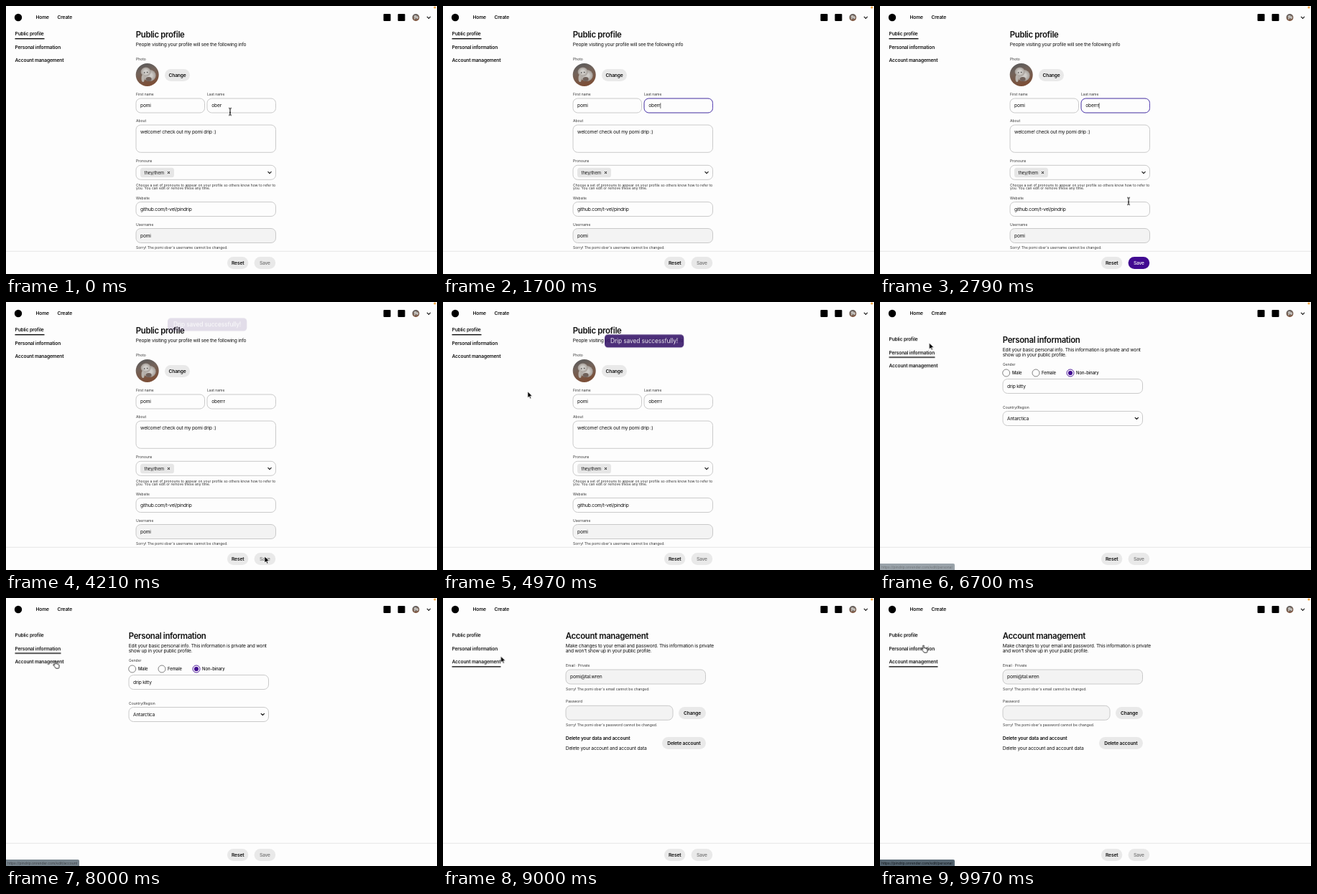
An HTML page for the animation above (10 s loop, 600 by 374 pixels).

```html
<!DOCTYPE html>
<html lang="en">
<head>
<meta charset="utf-8">
<title>Profile settings</title>
<style>
  html, body { margin: 0; width: 100%; height: 100%; overflow: hidden; background: #fdfdfd; }
  svg { display: block; width: 600px; height: 374px; }

  text { font: 400 6.67px Inter, Roboto, sans-serif; letter-spacing: -.03em; fill: #111; white-space: pre; }
  .bold { font-weight: 600; letter-spacing: -.025em; }
  .title { font-size: 11.4px; font-weight: 600; }
  .small { font-size: 5px; letter-spacing: 0; fill: #333; }
  .medium { font-size: 5.83px; letter-spacing: 0; font-weight: 500; }
  .mid { text-anchor: middle; }
  .field rect, .radio { fill: #fdfdfd; stroke: #c4c4c4; stroke-width: .9; }
  .field .off { fill: #f3f3f3; }
  .radio { stroke: #777; }
  .pill { fill: #e9e9e9; }
  .chevron { fill: none; stroke: #111; stroke-width: 1.1; stroke-linecap: round; stroke-linejoin: round; }

  /* One loop is 10 s, so 1% of a timeline is 100 ms. */
  .anim { animation: 10s linear infinite; }
  .step { animation: 10s step-end infinite; }

  .profile { animation-name: profile; }
  .personal { animation-name: personal; }
  .account { animation-name: account; }
  @keyframes profile { 0% { opacity: 1 } 66%, 100% { opacity: 0 } }
  @keyframes personal { 0% { opacity: 0 } 66% { opacity: 1 } 84.5%, 100% { opacity: 0 } }
  @keyframes account { 0% { opacity: 0 } 84.5%, 100% { opacity: 1 } }

  .nav { animation-name: nav; }
  @keyframes nav { 0% { transform: none } 66%, 100% { transform: translateY(13.2px) } }

  .focus { animation-name: focus; }
  @keyframes focus { 0% { opacity: 0 } 13% { opacity: 1 } 33.9%, 100% { opacity: 0 } }
  .caret { animation-name: caret; }
  @keyframes caret {
    0% { transform: none }
    17% { transform: translateX(2.3px) }
    19.5%, 100% { transform: translateX(4.6px) }
  }
  .key1 { animation-name: key1; }
  .key2 { animation-name: key2; }
  @keyframes key1 { 0% { fill: transparent } 17%, 100% { fill: #111 } }
  @keyframes key2 { 0% { fill: transparent } 19.5%, 100% { fill: #111 } }

  .save { animation-name: save; }
  .save-label { animation-name: save-label; }
  @keyframes save { 0%, 17% { fill: #e9e9e9 } 18.5%, 39.3% { fill: #410a91 } 40.3%, 100% { fill: #e9e9e9 } }
  @keyframes save-label { 0%, 17% { fill: #707070 } 18.5%, 39.3% { fill: #fff } 40.3%, 100% { fill: #707070 } }

  .toast { animation-name: toast; }
  .toast text { font-size: 8.33px; letter-spacing: -.01em; fill: #fff; }
  @keyframes toast {
    0% { opacity: 0; transform: translateY(-30px) }
    40.2% { opacity: 0; transform: translateY(-30px); animation-timing-function: ease }
    55.2%, 100% { opacity: 1; transform: none }
  }

  .status { animation-name: status; }
  .status text { letter-spacing: -.01em; fill: #10161b; }
  @keyframes status {
    0%, 60.6% { opacity: 0 } 61.7%, 66% { opacity: 1 }
    68.5%, 78.8% { opacity: 0 } 80.3%, 84.5% { opacity: 1 }
    87.5%, 97.6% { opacity: 0 } 98.8%, 100% { opacity: 1 }
  }
  .to-personal { animation-name: to-personal; }
  .to-account { animation-name: to-account; }
  @keyframes to-personal { 0% { opacity: 1 } 75% { opacity: 0 } 91%, 100% { opacity: 1 } }
  @keyframes to-account { 0% { opacity: 0 } 75% { opacity: 1 } 91%, 100% { opacity: 0 } }

  .pointer { animation-name: pointer; }
  @keyframes pointer {
    0%, .3% { transform: translate(312px, 147.5px) }
    2.1% { transform: translate(306px, 142px) }
    23.6% { transform: translate(306px, 142px); animation-timing-function: ease-in }
    27.9% { transform: translate(346px, 272px); animation-timing-function: ease-out }
    32.1% { transform: translate(360px, 355px) }
    43.9% { transform: translate(360px, 355px); animation-timing-function: cubic-bezier(.4, 0, .8, .8) }
    49.7% { transform: translate(118px, 125px); animation-timing-function: ease-out }
    53.9% { transform: translate(83px, 82px); animation-timing-function: step-end }
    56.7% { transform: translate(70px, 74px); animation-timing-function: step-end }
    58.5% { transform: translate(67px, 68px); animation-timing-function: step-end }
    60.9%, 73.3% { transform: translate(68.5px, 57px) }
    74.8%, 78.5% { transform: translate(68px, 80px) }
    79.4%, 86% { transform: translate(68.5px, 88px) }
    88.2%, 88.8% { transform: translate(82px, 86px) }
    90.3% { transform: translate(80px, 80px) }
    91.8% { transform: translate(80px, 80px); animation-timing-function: ease-in-out }
    98.2%, 100% { transform: translate(60.5px, 66px) }
  }
  .beam { animation-name: beam; fill: none; stroke: #000; }
  .arrow { animation-name: arrow; stroke: #fff; stroke-width: .7; }
  .hand { animation-name: hand; fill: #fff; stroke: #000; stroke-width: .8; stroke-linejoin: round; }
  @keyframes beam { 0% { opacity: 1 } 17% { opacity: 0 } 23.6% { opacity: 1 } 30.8%, 100% { opacity: 0 } }
  @keyframes arrow {
    0% { opacity: 0 } 39.8% { opacity: 1 } 60.9% { opacity: 0 }
    66% { opacity: 1 } 78.8% { opacity: 0 } 87% { opacity: 1 } 97.2%, 100% { opacity: 0 }
  }
  @keyframes hand {
    0% { opacity: 0 } 30.8% { opacity: 1 } 39.8% { opacity: 0 } 60.9% { opacity: 1 }
    66% { opacity: 0 } 78.8% { opacity: 1 } 87% { opacity: 0 } 97.2%, 100% { opacity: 1 }
  }
</style>
</head>
<body>
<svg viewBox="0 0 600 374">
  <defs>
    <path id="chevron" class="chevron" d="M-2.2-1.1 0 1.1 2.2-1.1"/>
    <linearGradient id="floor" x2=".3" y2="1">
      <stop offset="0" stop-color="#55585a"/>
      <stop offset=".45" stop-color="#73635a"/>
      <stop offset="1" stop-color="#7b4f38"/>
    </linearGradient>
    <radialGradient id="fur">
      <stop offset=".4" stop-color="#cfccc8"/>
      <stop offset="1" stop-color="#a39c96"/>
    </radialGradient>
    <g id="photo">
      <circle r="16" fill="url(#floor)"/>
      <ellipse cx="3" cy="1" rx="9" ry="8" fill="url(#fur)"/>
      <ellipse cx="-2" cy="-4" rx="7" ry="6.5" fill="url(#fur)"/>
      <ellipse cx="-6" cy="5" rx="2.2" ry="5" fill="#b9b3ad"/>
      <ellipse cx="2" cy="6" rx="4" ry="3" fill="#70615a"/>
      <circle cx="-4" cy="-3" r=".8" fill="#333"/>
      <circle cx="0" cy="-3.5" r=".8" fill="#333"/>
    </g>
  </defs>

  <rect width="600" height="374" fill="#fdfdfd"/>
  <circle cx="597" cy="2" r="1.6" fill="#f0a23c"/>

  <!-- Header -->
  <circle cx="17" cy="16" r="5.2"/>
  <text class="bold" x="41.5" y="18.4">Home</text>
  <text class="bold" x="71.5" y="18.4">Create</text>
  <rect x="525.5" y="11" width="10" height="10" rx="1"/>
  <rect x="545.5" y="11" width="10" height="10" rx="1"/>
  <use href="#photo" transform="translate(570.5 16) scale(.31)"/>
  <use href="#chevron" x="588.5" y="16.3"/>

  <!-- Side navigation -->
  <g class="nav step">
    <text class="bold" x="12.5" y="41.3">Public profile</text>
    <text class="bold" x="12.5" y="59.6">Personal information</text>
    <text class="bold" x="12.5" y="78">Account management</text>
    <rect class="profile step" x="12.5" y="45" width="41" height="1.3"/>
    <rect class="personal step" x="12.5" y="63.3" width="64" height="1.3"/>
    <rect class="account step" x="12.5" y="82" width="68" height="1.3"/>
  </g>

  <!-- Public profile -->
  <g class="profile step">
    <text class="title" x="180.8" y="43.9">Public profile</text>
    <text x="180.8" y="56">People visiting your profile will see the following info</text>
    <text class="small" x="181" y="75.9">Photo</text>
    <use href="#photo" x="196.7" y="96"/>
    <rect class="pill" x="221" y="88" width="35" height="17" rx="8.5"/>
    <text class="bold mid" x="238.5" y="98.9">Change</text>

    <text class="small" x="181" y="125.3">First name</text>
    <text class="small" x="280" y="125.3">Last name</text>
    <text class="small" x="181" y="161.9">About</text>
    <text class="small" x="181" y="218">Pronouns</text>
    <text class="small" x="181" y="252">Choose a set of pronouns to appear on your profile so others know how to refer to</text>
    <text class="small" x="181" y="256.4">you. You can edit or remove these any time.</text>
    <text class="small" x="181" y="269.8">Website</text>
    <text class="small" x="181" y="306.7">Username</text>
    <text class="small" x="181" y="339.3">Sorry! The pomi ober's username cannot be changed.</text>

    <g class="field">
      <rect x="181" y="129" width="95.5" height="20" rx="6.5"/>
      <rect x="280" y="129" width="95.5" height="20" rx="6.5"/>
      <rect x="181" y="166" width="194.5" height="38.3" rx="6.5"/>
      <rect x="181" y="222.3" width="194.5" height="20" rx="6.5"/>
      <rect x="181" y="273.5" width="194.5" height="20" rx="6.5"/>
      <rect class="off" x="181" y="310.5" width="194.5" height="20" rx="6.5"/>
    </g>
    <text x="187" y="141.4">pomi</text>
    <text x="286.3" y="141.4">ober<tspan class="key1 step">r</tspan><tspan class="key2 step">r</tspan></text>
    <text x="187" y="178.3">welcome! check out my pomi drip :)</text>
    <rect x="187" y="225.7" width="47" height="13.5" rx="3.5" fill="#e6e6e6"/>
    <text class="medium" style="font-weight:400" x="192.5" y="234.6">they/them</text>
    <path d="m225 231 3 3m0-3-3 3" stroke="#111"/>
    <use href="#chevron" x="367" y="232.5"/>
    <text x="187" y="286">github.com/t-vel/pindrip</text>
    <text x="187" y="323">pomi</text>

    <g class="focus step">
      <rect x="280" y="129" width="95.5" height="20" rx="6.5" fill="none" stroke="#5b45b8"/>
      <rect class="caret step" x="300.2" y="135.3" width=".6" height="7.6"/>
    </g>

    <g class="toast anim">
      <rect x="225" y="48.3" width="110.3" height="18" rx="4.5" fill="#3a1a6c"/>
      <text class="mid" x="280" y="60.4">Drip saved successfully!</text>
    </g>
  </g>

  <!-- Personal information -->
  <g class="personal step">
    <text class="title" x="170.8" y="57">Personal information</text>
    <text x="170.8" y="69.3">Edit your basic personal info. This information is private and wont</text>
    <text x="170.8" y="75.9">show up in your public profile.</text>
    <text class="small" x="171" y="89.2">Gender</text>
    <circle class="radio" cx="175.7" cy="99" r="5"/>
    <circle class="radio" cx="217" cy="99" r="5"/>
    <circle class="radio" cx="265" cy="99" r="5" style="stroke:#410a91"/>
    <circle cx="265" cy="99" r="3.1" fill="#410a91"/>
    <text class="medium" x="184" y="100.6">Male</text>
    <text class="medium" x="225" y="100.6">Female</text>
    <text class="medium" x="273" y="100.6">Non-binary</text>
    <text class="small" x="171" y="149">Country/Region</text>
    <g class="field">
      <rect x="171" y="107.5" width="194.5" height="20" rx="6.5"/>
      <rect x="171" y="152.5" width="194.5" height="20" rx="6.5"/>
    </g>
    <text x="177" y="119.8">drip kitty</text>
    <text x="177" y="164.9">Antarctica</text>
    <use href="#chevron" x="357.3" y="162.4"/>
  </g>

  <!-- Account management -->
  <g class="account step">
    <text class="title" x="170.8" y="57">Account management</text>
    <text x="170.8" y="69.3">Make changes to your email and password. This information is private</text>
    <text x="170.8" y="75.9">and won't show up in your public profile.</text>
    <text class="small" x="171" y="95.9">Email · Private</text>
    <text class="small" x="171" y="128.8">Sorry! The pomi ober's email cannot be changed.</text>
    <text class="small" x="171" y="146.3">Password</text>
    <text class="small" x="171" y="178.9">Sorry! The pomi ober's password cannot be changed.</text>
    <g class="field">
      <rect class="off" x="171" y="100" width="194.5" height="20" rx="6.5"/>
      <rect class="off" x="171" y="150.3" width="149" height="20" rx="6.5"/>
    </g>
    <text x="177" y="112.4">pomi@tal.wren</text>
    <rect class="pill" x="328" y="152" width="38" height="17" rx="8.5"/>
    <text class="bold mid" x="347" y="162.8">Change</text>
    <text class="bold" x="170.8" y="197.9">Delete your data and account</text>
    <text x="170.8" y="212">Delete your account and account data</text>
    <rect class="pill" x="305" y="194" width="61" height="17" rx="8.5"/>
    <text class="bold mid" x="335.4" y="204.9">Delete account</text>
  </g>

  <!-- Footer -->
  <rect y="341.5" width="600" height="32.5" fill="#f3f3f3"/>
  <rect y="342.3" width="600" height="1" fill="#e9e9e9"/>
  <rect y="343" width="600" height="31" fill="#fdfdfd"/>
  <rect class="pill" x="308" y="350" width="29.3" height="17" rx="8.5"/>
  <text class="bold mid" x="322.7" y="360.9">Reset</text>
  <rect class="save anim" x="345.6" y="350" width="29.6" height="17" rx="8.5"/>
  <text class="save-label anim mid" style="font-weight:500" x="360.4" y="360.9">Save</text>

  <!-- Link preview -->
  <g class="status anim">
    <g class="to-personal step">
      <path d="M0 365h102q2 0 2 2v7H0z" fill="#566672"/>
      <text class="small" x="2" y="371.5">https://pindrip.onrender.com/edit/personal</text>
    </g>
    <g class="to-account step">
      <path d="M0 365h100q2 0 2 2v7H0z" fill="#566672"/>
      <text class="small" x="2" y="371.5">https://pindrip.onrender.com/edit/account</text>
    </g>
  </g>

  <!-- Mouse pointer, with its hot spot at 0,0 -->
  <g class="pointer anim">
    <path class="beam step" d="M-2-5Q0-5 0-3.8 0-5 2-5M0-3.8V3.8M-2 5Q0 5 0 3.8 0 5 2 5M-1 1.2h2"/>
    <path class="arrow step" d="M0 0v9l2.1-2 1.4 3.2 1.5-.6-1.4-3.2h2.9z"/>
    <path class="hand step" d="M-.9 5.6V.9a.9.9 0 0 1 1.8 0v2.8q1.4-.4 1.7.5 1.3-.3 1.6.6 1.3-.1 1.3 1.2v2q0 1-.7 2.2H.9Q-.6 8-2.3 6q-.9-1.3.2-1.4.6 0 1.2 1z"/>
  </g>
</svg>
</body>
</html>
```
